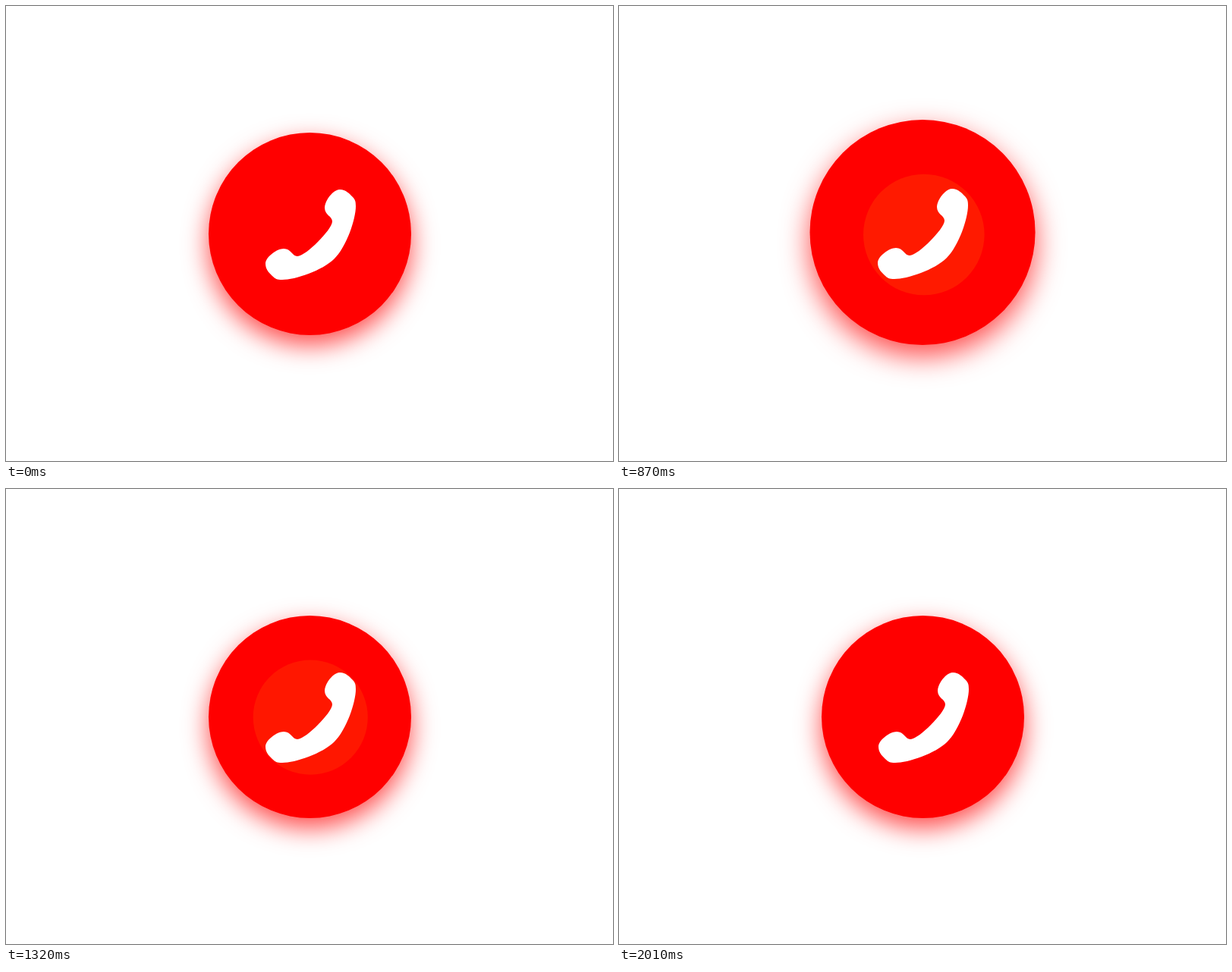
Write an HTML page that moves like this. It is 800 by 600 pixels and loops after 2.4 s.

```html
<!DOCTYPE html>
<html>
<head>
<meta charset="utf-8">
<style>
html, body { margin: 0; width: 100%; height: 100%; overflow: hidden; background: #fff; }
#button {
  position: absolute; left: 267px; top: 167px; width: 267px; height: 267px;
  border-radius: 50%; background: #f00;
  box-shadow: 0 13px 33px rgba(255, 0, 0, .7);
  transform-origin: 137.5px 150.5px;
}
svg { position: absolute; left: 0; top: 0; }
</style>
</head>
<body>
<div id="button"></div>
<svg width="800" height="600">
  <circle id="ripple" fill="#ff1a00"/>
  <path id="phone" fill="#fff" d="M411 311C420 302 430 290 430 284C430 277 420 276 420 266
    C420 257 431 242 440 242C448 242 453 248 456 251C460 255 461 257 461 264
    C461 281 449 317 433 333C417 349 381 361 364 361C357 361 355 360 351 356
    C348 353 342 348 342 340C342 331 357 320 366 320C376 320 377 330 384 330
    C390 330 402 320 411 311Z"/>
</svg>
<script>
const LOOP = 2400, STEP = 30;
const SWELL = 345, SHRUNK = 1260, BURST = 1215, END = 2010;
const [button, ripple, phone] = ['button', 'ripple', 'phone'].map(id => document.getElementById(id));

function drawRipple(t) {
  let r = 0, alpha = 1, p = 0;
  if (t >= BURST && t < END) {
    // fast burst that slows down and fades
    p = 1 - Math.exp(-.0052 * (t - BURST));
    r = 179.6 * p;
    alpha = Math.min(1, 1.57 * (1 - p));
  } else if (t > SWELL && t < BURST) {
    r = .152 * (t - SWELL);
  }
  const shift = 1.3 * (1 - p);
  ripple.setAttribute('r', r);
  ripple.setAttribute('cx', 400.5 + shift);
  ripple.setAttribute('cy', 300.5 + shift * .8);
  ripple.setAttribute('opacity', alpha);
}

function draw(now) {
  const t = Math.floor(now % LOOP / STEP) * STEP;
  const half = (SHRUNK - SWELL) / 2;
  const grow = .132 * Math.max(0, 1 - Math.abs(t - SWELL - half) / half);
  button.style.transform = `scale(${1 + grow})`;
  drawRipple(t);

  const shake = t > 210 && t < 834 ? -7 * Math.sin((t - 210) / 312 * 2 * Math.PI) : 0;
  const nudge = Math.min(1, grow * 20);
  phone.setAttribute('transform', `translate(${shake - nudge} ${-nudge})`);
}

const start = performance.now();
function tick() {
  draw(performance.now() - start);
  requestAnimationFrame(tick);
}
tick();
</script>
</body>
</html>
```
